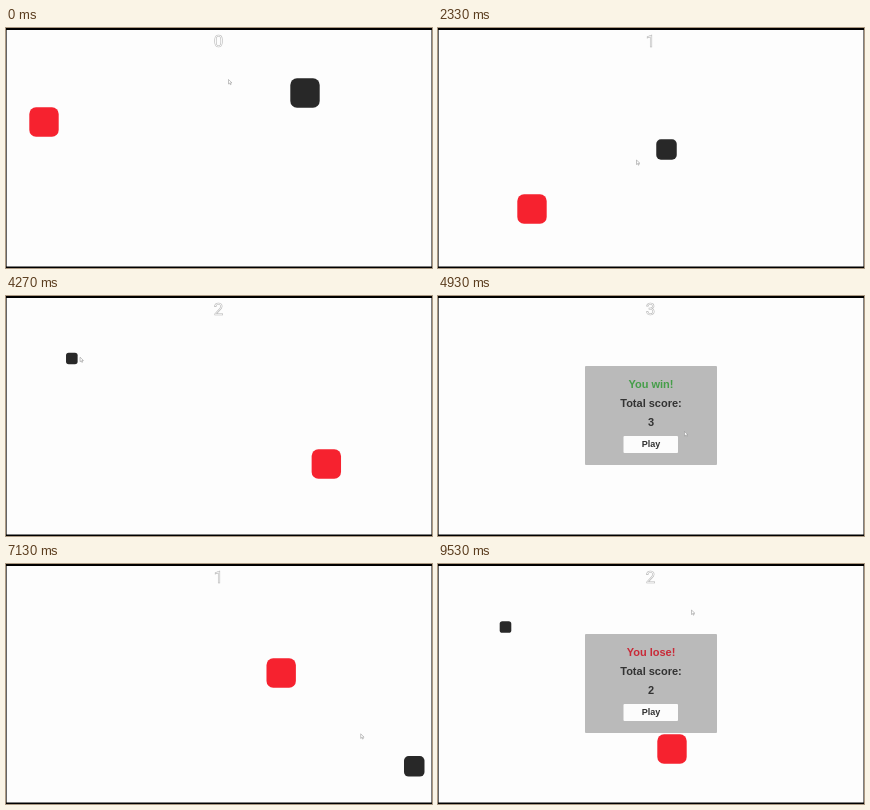
These frames come from a looping animation (426 px wide and 240 px high, 9590 ms). An HTML page:

```html
<!DOCTYPE html>
<html lang="en">
<head>
<meta charset="utf-8">
<title>Catch the square</title>
<style>
  html, body { margin: 0; width: 100%; height: 100%; overflow: hidden; background: #fdfdfd; }
  svg { display: block; width: 100%; height: 100%; }
  text { font-family: "Liberation Sans", Arial, sans-serif; text-anchor: middle; }
  #panel text { font-weight: bold; font-size: 11px; fill: #333; }
  #panel .small { font-size: 9px; }
  #score { font: 17px Roboto, sans-serif; fill: #fefefe; stroke: #b4b4b4; stroke-width: .6px; }
</style>
</head>
<body>
<svg viewBox="0 0 426 240">
  <rect width="426" height="240" fill="#fdfdfd"/>
  <rect id="red" fill="#f6222f"/>
  <rect id="dark" fill="#282828"/>
  <g id="panel">
    <rect x="147" y="70" width="132" height="99" rx="1" fill="#bababa"/>
    <text id="title" x="213" y="91.5"></text>
    <text x="213" y="111">Total score:</text>
    <text id="total" x="213" y="130"></text>
    <rect x="185.5" y="140" width="54.5" height="17" rx="1" fill="#fcfcfc"/>
    <text class="small" x="213" y="151.3">Play</text>
  </g>
  <text id="score" x="212.5" y="19"></text>
  <path d="M0 0H426V240H0ZM.6 2V238.4H425.5V2Z" fill="#000" fill-rule="evenodd"/>
  <path id="cursor" d="M0 0V4.5L1.1 3.6 1.8 5.2 2.6 4.9 1.9 3.3H3.4Z" fill="#fff" stroke="#888" stroke-width=".5"/>
</svg>
<script>
const LOOP = 9590, STEP = 200 / 3, RESTART = 5860;
const $ = id => document.getElementById(id);
const [red, dark, panel, title, total, score, cursor] =
  ["red", "dark", "panel", "title", "total", "score", "cursor"].map($);

// Each body runs straight through a few poses; walls fold its path back.
const rounds = [
  { times: [0, 2330, 3530], clicks: [1530, 2930, 4330], end: 4330, won: true,
    red: [[38, 94], [-64, -147], [-204, -207]],
    dark: [[299, 65], [593.5, 324.5], [757, 361]] },
  { times: [6000, 8270, 9530], clicks: [6800, 7600], end: 8200, won: false,
    red: [[91, 97], [461, 121], [588, 185]],
    dark: [[245, 61], [584, 345], [754.5, 383]] }
];
const roundAt = t => rounds[t < RESTART ? 0 : 1];
const mix = (a, b, u) => a.map((v, i) => v + (b[i] - v) * u);

function fold(v, low, high) {
  const span = high - low;
  const d = (((v - low) % (2 * span)) + 2 * span) % (2 * span);
  return low + Math.min(d, 2 * span - d);
}

function bodyAt(name, t) {
  const { times, [name]: poses } = roundAt(t);
  const i = t < times[1] ? 0 : 1;
  const u = (t - times[i]) / (times[i + 1] - times[i]);
  const [x, y] = mix(poses[i], poses[i + 1], u);
  return [fold(x, 15, 411), fold(y, 17, 223)];
}

// The pointer rests at these spots and visits the dark square at every click.
const stops = [
  [0, [222.5, 51.5]], [2330, [198.5, 132]], [3530, [77.5, 94.5]],
  [4930, [246.5, 135.5]], [RESTART, [212, 145]], [6000, [210.5, 124]],
  [8200, bodyAt("red", 8200)], [8270, [347.5, 110.5]], [9530, [253.5, 46]],
  ...rounds.flatMap(r => r.clicks).map(t => [t, bodyAt("dark", t)])
].sort((a, b) => a[0] - b[0]);

function cursorAt(t) {
  const i = Math.max(1, stops.findIndex(s => s[0] >= t));
  const [t0, from] = stops[i - 1], [t1, to] = stops[i];
  const u = (t - t0) / (t1 - t0);
  return mix(from, to, u * u * (3 - 2 * u));
}

function place(box, [x, y], size) {
  const set = { x: x - size / 2, y: y - size / 2, width: size, height: size, rx: size * .23 };
  for (const key in set) box.setAttribute(key, set[key]);
}

const show = (el, on) => el.setAttribute("visibility", on ? "visible" : "hidden");

function draw(t) {
  const { clicks, end, won } = roundAt(t);
  const points = clicks.filter(c => c <= t).length;
  const over = t >= end;

  place(red, bodyAt("red", t), 29.4);
  place(dark, bodyAt("dark", t), 29.4 - 8.9 * points);
  show(red, !(over && won));
  show(dark, !(over && won));
  show(panel, over);
  title.textContent = won ? "You win!" : "You lose!";
  title.style.fill = won ? "#459e49" : "#c92a38";
  score.textContent = total.textContent = points;
  cursor.setAttribute("transform", `translate(${cursorAt(t)})`);
}

function tick() {
  const t = performance.now() % LOOP;
  const frame = Math.min(143, Math.floor((t + 4) / STEP));
  draw(Math.min(9530, Math.round(frame * STEP / 10) * 10));
  requestAnimationFrame(tick);
}
tick();
</script>
</body>
</html>
```
